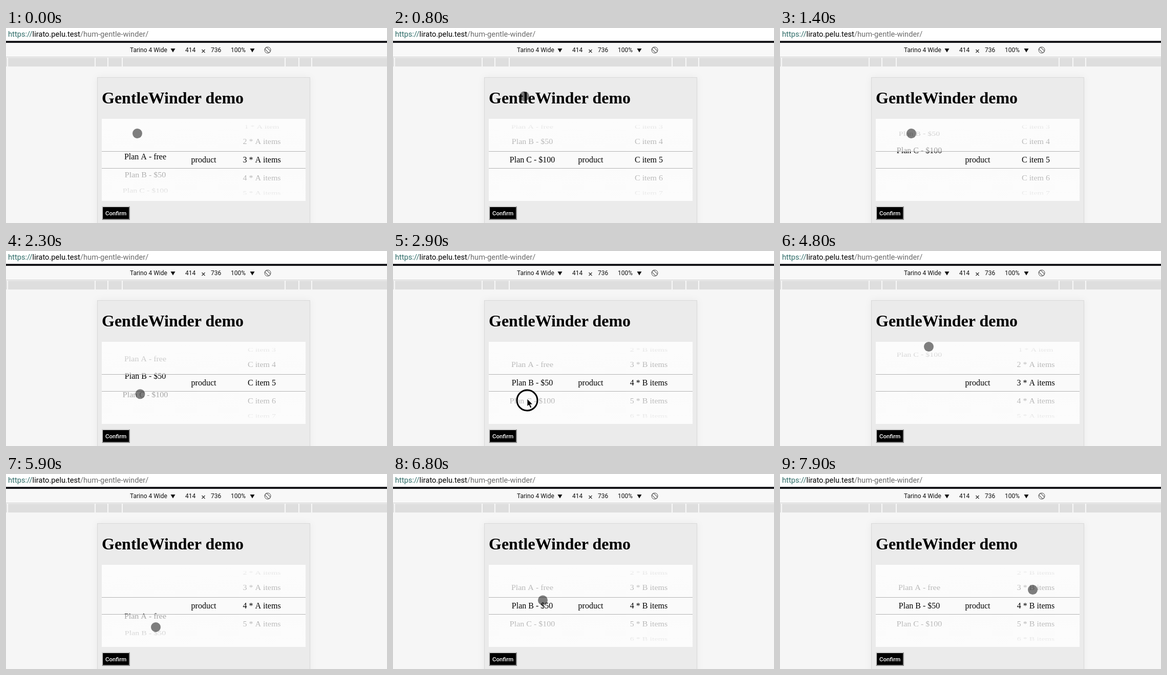
An HTML page for the animation above (8000 ms loop, 744 px wide and 380 px high).

```html
<!DOCTYPE html>
<html lang="en">
<head>
<meta charset="utf-8">
<title>Picker demo</title>
<style>
  html, body { margin: 0; width: 100%; height: 100%; overflow: hidden; background: #f6f6f6; }
  svg { display: block; width: 744px; height: 380px; }
  .ui { font: 12px Roboto, sans-serif; fill: #111; }
  .url { font-size: 14.7px; }
  .button { font-size: 11.5px; font-weight: 500; fill: #fff; }
  .row { font: 16px "Liberation Serif", serif; font-kerning: none; text-anchor: middle; }
  .title { font: bold 32px "Liberation Serif", serif; }
  .panel { fill: #ebebeb; stroke: #d8d8d8; filter: drop-shadow(0 0 7px rgba(0, 0, 0, .05)); }
</style>
</head>
<body>
<svg viewBox="0 0 744 380">
  <defs>
    <linearGradient id="fade" x1="0" y1="0" x2="0" y2="1">
      <stop offset=".06" stop-color="#fcfcfc"/>
      <stop offset="1" stop-color="#fcfcfc" stop-opacity=".62"/>
    </linearGradient>
    <clipPath id="box"><rect x="187" y="177" width="398" height="160"/></clipPath>
  </defs>

  <!-- browser chrome -->
  <rect width="744" height="25" fill="#fff"/>
  <text class="ui url" x="4" y="16.5"><tspan fill="#2c6a66">https://</tspan><tspan fill="#000">lirato.pelu.test</tspan><tspan fill="#6b6b6b">/hum-gentle-winder/</tspan></text>
  <rect y="25" width="744" height="4" fill="#17171b"/>
  <rect y="29" width="744" height="29" fill="#f8f8f8"/>
  <rect y="56" width="744" height="1" fill="#ccc"/>
  <g class="ui">
    <text x="242" y="47">Tarino 4 Wide</text>
    <text x="350" y="47">414</text>
    <text x="400" y="47">736</text>
    <text x="439" y="47">100%</text>
    <path d="M321.500 40h9l-4.500 7.500zM476.500 40h9l-4.500 7.500z"/>
    <path d="M382.500 42l6 6m0-6l-6 6" stroke="#333" stroke-width="1.300"/>
  </g>
  <g transform="translate(511 43) rotate(-45)" fill="none" stroke="#555">
    <circle r="6"/>
    <rect x="-2.500" y="-5.500" width="5" height="11" rx="1" fill="#f8f8f8"/>
  </g>
  <rect y="58" width="744" height="17" fill="#dedede"/>
  <path d="M3 58v17M174 58v17M199 58v17M227 58v17M545 58v17M572 58v17M597 58v17" stroke="#f8f8f8" stroke-width="2"/>

  <!-- page -->
  <rect class="panel" x="178.500" y="96.500" width="415" height="300"/>
  <text class="title" x="187" y="147">GentleWinder demo</text>
  <rect x="187" y="177" width="398" height="160" fill="#fafafa"/>
  <g id="rows" class="row" clip-path="url(#box)">
    <text x="386" y="262">product</text>
  </g>
  <rect x="187" y="177" width="398" height="63" fill="url(#fade)"/>
  <rect width="398" height="63" fill="url(#fade)" transform="translate(187 337) scale(1 -1)"/>
  <path d="M187 240.500h398M187 273.500h398" stroke="#b3b3b3"/>
  <rect x="188" y="348" width="53" height="25"/>
  <path d="M188 374v-26h54" fill="none" stroke="#d4d4d4" stroke-width="2"/>
  <path d="M188 373h53v-25" fill="none" stroke="#8a8a8a" stroke-width="2"/>
  <text class="ui button" x="194" y="365">Confirm</text>

  <!-- pointer -->
  <g id="pointer">
    <circle id="touch" r="9.500" fill-opacity=".5"/>
    <g id="click">
      <circle r="20" fill="none" stroke="#000" stroke-width="3"/>
      <path d="M0 -3v15l3.400-3 2.600 6 2.800-1.200-2.600-5.800h4.800z" stroke="#fff"/>
    </g>
  </g>
</svg>
<script>
const LOOP = 8000, STEP = 100;
const ROW = 35, RADIUS = 90, ANGLE = 23 * Math.PI / 180, LIMIT = 50 * Math.PI / 180;
const GLIDE = 300, SNAP = 300, SLIDE = 200, CLICK = 2900;
const $ = id => document.getElementById(id);

const plans = ["Plan A - free", "Plan B - $50", "Plan C - $100"];
const series = (n, label) => Array.from({ length: n }, (_, i) => label(i + 1));
const items = [
  series(5, n => `${n} * A item${n > 1 ? "s" : ""}`),
  series(7, n => `${n} * B items`),
  series(9, n => `C item ${n}`)
];

const drag = (start, end, x, from, to) => ({ start, end, x, from, to });
const hover = (time, x, y) => drag(time, time, x, y, y);
const gestures = [
  drag(-100, 500, 256.5, 211.3, 133),
  drag(1100, 1400, 256.5, 223, 205.5),
  drag(2000, 2500, 262, 256, 291),
  drag(3200, 3600, 262.5, 256.5, 291.5),
  drag(4100, 4800, 290.5, 314, 186.5),
  drag(5400, 5800, 292.5, 208.5, 304.5),
  drag(6100, 6500, 292.5, 281, 246),
  hover(7300, 428, 254),
  hover(7600, 522, 240),
  hover(7900, 493.5, 225.5)
];

const clamp = (v, lo, hi) => Math.min(hi, Math.max(lo, v));
const mix = (a, b, p) => a + (b - a) * p;
function ease(t, start, end) {
  const p = clamp((t - start) / Math.max(end - start, 1), 0, 1);
  return p * p * (3 - 2 * p);
}

// Replay the gestures: glide to each, pull the plan wheel, then let both wheels settle.
function poseAt(t) {
  let plan = 0, index = 0, item = 2, x = 0, y = 0;
  for (const g of gestures) {
    const reach = ease(t, g.start - GLIDE, g.start);
    x = mix(x, g.x, reach);
    y = mix(y, g.from, reach);
    if (t < g.start) break;
    y = mix(g.from, g.to, ease(t, g.start, g.end));
    index = plan + (g.from - y) / ROW;
    if (t <= g.end) break;
    plan = clamp(Math.round(index), 0, plans.length - 1);
    index = mix(index, plan, ease(t, g.end, g.end + SNAP));
    item = mix(item, plan + 2, ease(t, g.end, g.end + SLIDE));
  }
  return { plan, index, item, x, y };
}

function makeRows(count) {
  return Array.from({ length: count }, () => {
    const row = document.createElementNS("http://www.w3.org/2000/svg", "text");
    row.setAttribute("y", 5);
    return $("rows").appendChild(row);
  });
}

// Lay labels around a horizontal cylinder, with `index` facing the viewer.
function drawWheel(rows, labels, index, x) {
  rows.forEach((row, i) => {
    const angle = (i - index) * ANGLE;
    const shown = i < labels.length && Math.abs(angle) < LIMIT;
    row.textContent = shown ? labels[i] : "";
    row.setAttribute("transform",
      `translate(${x} ${257 + RADIUS * Math.sin(angle)}) scale(1 ${shown ? Math.cos(angle) : 1})`);
  });
}

const planRows = makeRows(3), itemRows = makeRows(9);

function draw(now) {
  const t = Math.floor(now % LOOP / STEP) * STEP;
  const { plan, index, item, x, y } = poseAt(t);
  drawWheel(planRows, plans, index, 272);
  drawWheel(itemRows, items[plan], item, 499.5);
  $("pointer").setAttribute("transform", `translate(${x} ${y})`);
  const clicking = Math.abs(t - CLICK) < STEP;
  $("touch").style.display = clicking ? "none" : "";
  $("click").style.display = clicking ? "" : "none";
}

const start = performance.now();
function frame() {
  draw(performance.now() - start);
  requestAnimationFrame(frame);
}
frame();
</script>
</body>
</html>
```
